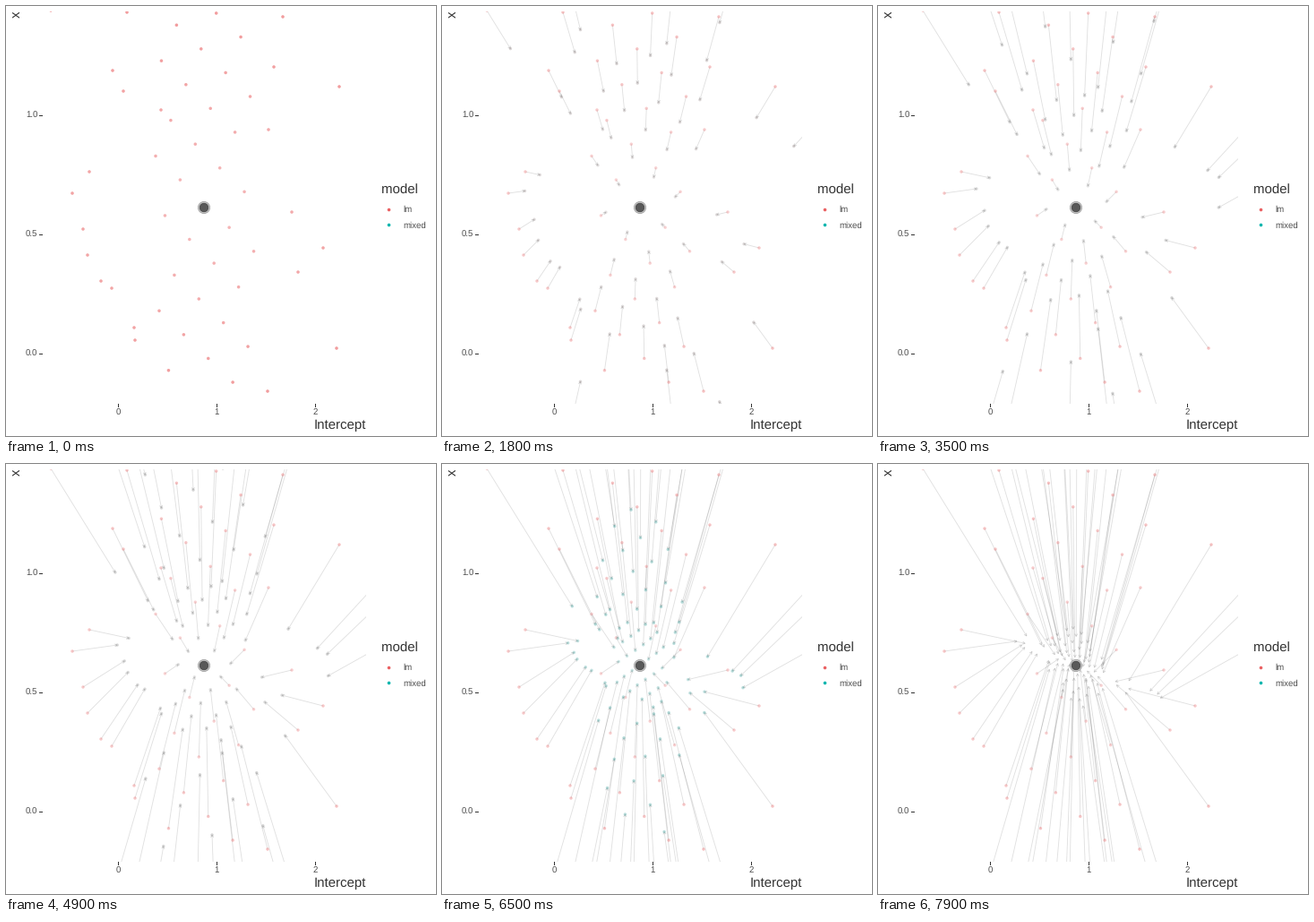
Write a matplotlib script that moves like this. It is 480 by 480 pixels and loops after 10000 ms.

```python
import numpy as np
import matplotlib.pyplot as plt
from matplotlib.animation import FuncAnimation
from matplotlib.collections import LineCollection
from matplotlib.colors import to_rgb
from matplotlib.patches import Circle, Rectangle

plt.rcParams["font.family"] = "Liberation Sans"
plt.rcParams["text.hinting"] = "none"

SIZE, FRAMES, LAST = 480, 100, 79
RED, GRAY, TEAL = (np.array(to_rgb(c)) for c in ("#ea6062", "#999999", "#00b5ad"))
CENTER = np.array([221, 225])
GOLDEN = (np.sqrt(5) - 1) / 2

# The outermost lm fits, in stage pixels
OUTER = [
    (50, 5), (135, 7), (309, 12), (119, 72), (131, 95), (173, 116), (299, 68), (372, 90),
    (293, 138), (93, 185), (74, 209), (86, 249), (91, 278), (106, 307), (118, 315),
    (319, 230), (354, 270), (326, 297), (143, 359), (144, 373), (369, 382), (292, 430),
    (419, 128), (435, 139), (432, 196),
]


def column(heights, spread):
    """Fits at the given heights from the centre, spread evenly to both sides."""
    side = 2 * (np.arange(1, len(heights) + 1) * GOLDEN % 1) - 1
    return CENTER + np.column_stack([spread * side, heights])


def shrink(points):
    """Pull lm fits to the mean; slope follows intercept, remote fits move most."""
    dx, dy = (points - CENTER).T
    x = 0.45 * dx / (1 + (dy / 350) ** 2)
    return CENTER + np.column_stack([x, 0.4 * x + 0.05 * dy])


start = np.vstack([
    OUTER,
    column(np.linspace(-217, 195, 32), 58),
    column(-235 * 1.066 ** np.arange(20), 150),
    column(230 * 1.09 ** np.arange(16), 150),
])
shift = shrink(start) - start
heading = shift / np.linalg.norm(shift, axis=1, keepdims=True)
alpha = 0.24 + 0.14 * np.clip(np.linalg.norm(start - CENTER, axis=1) / 200, 0, 1)

fig = plt.figure(figsize=(SIZE / 72, SIZE / 72), dpi=72, facecolor="white")
ax = fig.add_axes([0, 0, 1, 1])
ax.set(xlim=(0, SIZE), ylim=(SIZE, 0))
ax.axis("off")
panel = Rectangle((40, 5.5), 362, 438.5, transform=ax.transData)


def rgba(color):
    return np.column_stack([np.tile(color, (len(alpha), 1)), alpha])


def blend(p):
    """Red turns gray early and teal only towards the end."""
    return [np.interp(p, [0, 0.25, 0.62, 1], k) for k in zip(RED, GRAY, GRAY, TEAL)]


def rotate(vectors, degrees):
    c, s = np.cos(np.radians(degrees)), np.sin(np.radians(degrees))
    return vectors @ np.array([[c, s], [-s, c]])


def label(x, y, text, size, color="#4d4d4d", **style):
    ax.text(x, y, text, size=size, color=color, va="baseline", **style)


def draw_guides():
    for x, text in zip((125, 235, 345), "012"):
        ax.plot([x, x], [444, 447], color="#333333", lw=1)
        label(x, 456.5, text, 9.6, ha="center")
    for y, text in zip((121.5, 254.5, 387.5), ("1.0", "0.5", "0.0")):
        ax.plot([37, 40], [y, y], color="#333333", lw=1)
        label(35.2, y + 3.5, text, 9.6, ha="right")
    label(402, 472, "Intercept", 15, "#333333", ha="right")
    label(16, 5.2, "x", 15, "#333333", ha="right", rotation=90, rotation_mode="anchor")
    label(418.5, 210, "model", 15, "#333333")
    for y, text, color in ((226.5, "lm", RED), (244, "mixed", TEAL)):
        ax.scatter([427.3], [y], s=13, color=[color], lw=0)
        label(443, y + 3.7, text, 9.6)


draw_guides()
shafts = LineCollection([], colors=[(0, 0, 0, 0.12)], linewidths=0.9, zorder=2)
heads = LineCollection([], colors=[(0, 0, 0, 0.16)], linewidths=0.9, zorder=2)
for lines in (shafts, heads):
    ax.add_collection(lines, autolim=False)
fixed = ax.scatter(*start.T, s=12, c=rgba(RED), lw=0, zorder=3)
moving = ax.scatter(*start.T, s=12, c=rgba(RED), lw=0, zorder=4)
for artist in (shafts, heads, fixed, moving):
    artist.set_clip_path(panel)
ax.add_patch(Circle(CENTER, 6.6, fc="#c4c4c4", ec="#a0a0a0", lw=0.8, zorder=5))
ax.add_patch(Circle(CENTER, 4.7, fc="#595959", ec="#444444", lw=0.8, zorder=6))


def update(i):
    p = min(i, LAST) / LAST
    tip = start + p * shift
    shafts.set_segments(np.stack([start, tip], axis=1) if p else [])
    barbs = [tip - 3.2 * rotate(heading, a) for a in (-28, 28)]
    heads.set_segments(np.stack([barbs[0], tip, barbs[1]], axis=1) if p else [])
    moving.set_offsets(tip)
    moving.set_facecolors(rgba(blend(p)))
    moving.set_visible(p < 1)  # only the arrows remain at the end
    return shafts, heads, moving


anim = FuncAnimation(fig, update, frames=FRAMES, interval=100, repeat=True, repeat_delay=0)
plt.show()
```
